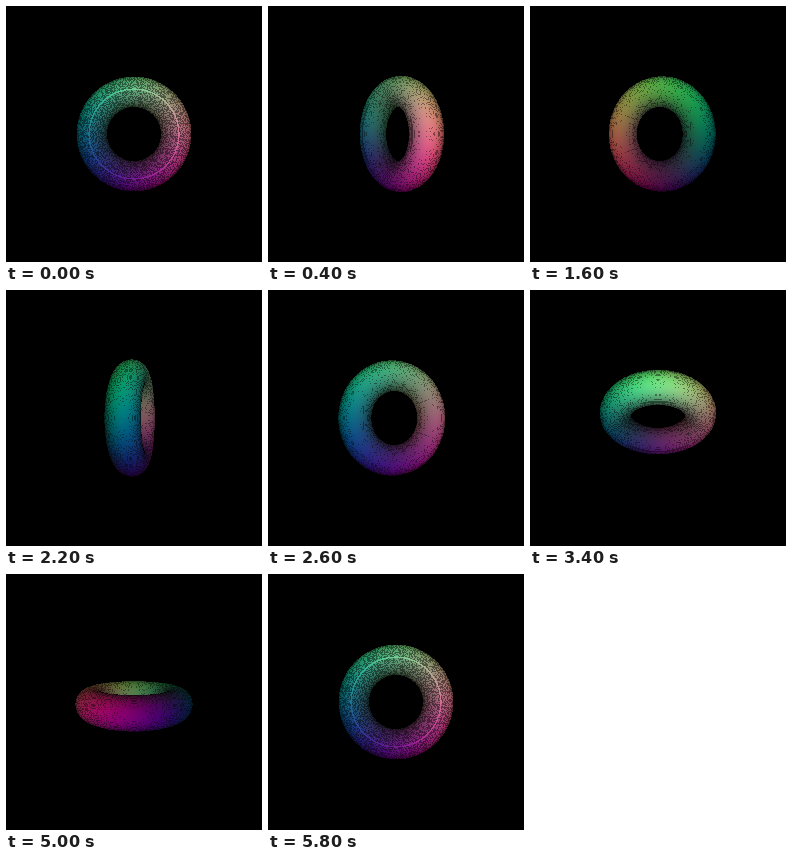
Animation, 256 px wide and 256 px high, one loop 6 s. Source, as an HTML page with a canvas:

```html
<!DOCTYPE html>
<html lang="en">
<head>
<meta charset="utf-8">
<title>Orbiting torus</title>
<style>
  html, body { margin: 0; width: 100%; height: 100%; overflow: hidden; background: #000; }
  canvas { display: block; width: 100%; height: 100%; image-rendering: pixelated; }
</style>
</head>
<body>
<canvas id="stage" width="256" height="256"></canvas>
<script>
const ctx = document.getElementById('stage').getContext('2d');
const SIZE = 256, MID = 128, REACH = 62;
const RING = 42, TUBE = 15, DIST = 235;
const STEP = 200, POSES = 30, HALF = POSES / 2;
const image = ctx.createImageData(SIZE, SIZE);

// The camera circles sideways first, then over the top, always upright.
function cameraDir(pose) {
  const a = (pose % HALF) / (HALF - 1) * 2 * Math.PI;
  const s = Math.sin(a), c = Math.cos(a);
  return pose < HALF ? [s, 0, c] : [0, s, c];
}

function cross(a, b) {
  return [
    a[1] * b[2] - a[2] * b[1],
    a[2] * b[0] - a[0] * b[2],
    a[0] * b[1] - a[1] * b[0]
  ];
}

function normalize(v) {
  const len = Math.hypot(...v);
  return v.map(n => n / len);
}

function noise(x, y) {
  const n = Math.sin(x * 12.9898 + y * 78.233) * 43758.5453;
  return n - Math.floor(n);
}

// Distance along the ray to the torus, or -1 on a miss.
function trace(eye, dir) {
  let t = DIST - REACH;
  for (let i = 0; i < 90 && t < DIST + REACH; i++) {
    const x = eye[0] + dir[0] * t, y = eye[1] + dir[1] * t, z = eye[2] + dir[2] * t;
    const q = Math.sqrt(x * x + y * y) - RING;
    const d = Math.sqrt(q * q + z * z) - TUBE;
    if (d < 0.001) return t;
    t += d;
  }
  return -1;
}

// Fine dark grain, denser where the surface turns away from the camera.
function grain(t, facing, px, py, faceOn) {
  if (faceOn) return noise(px, py) < 0.5 ? 0.5 : 0.88;
  const depth = t * 2.7;
  const share = 0.5 * (1 - facing * facing);
  return depth - Math.floor(depth) < share ? 0.55 : 0.92;
}

function shade(p, dir, t, px, py, faceOn) {
  const [x, y, z] = p;
  const rho = Math.hypot(x, y), q = rho - RING;
  if (faceOn && Math.abs(q) < 0.65) return 0.9;
  const normal = [x * q / rho / TUBE, y * q / rho / TUBE, z / TUBE];
  const facing = Math.max(0, -normal.reduce((sum, n, i) => sum + n * dir[i], 0));
  const inner = 0.85 + 0.15 * q / TUBE;
  return (0.3 + 0.7 * facing) * inner * grain(t, facing, px, py, faceOn);
}

function draw(pose) {
  const back = cameraDir(pose);
  const right = normalize(cross([0, 1, 0], back));
  const up = cross(back, right);
  const eye = back.map(n => n * DIST);
  const faceOn = Math.abs(back[2]) > 0.999;
  const data = image.data;
  for (let py = 0; py < SIZE; py++) {
    for (let px = 0; px < SIZE; px++) {
      const at = (py * SIZE + px) * 4;
      data[at] = data[at + 1] = data[at + 2] = 0;
      data[at + 3] = 255;
      const u = px + 0.5 - MID, v = MID - py - 0.5;
      if (Math.abs(u) > REACH || Math.abs(v) > REACH) continue;
      const dir = normalize(back.map((n, i) => right[i] * u + up[i] * v - n * DIST));
      const t = trace(eye, dir);
      if (t < 0) continue;
      const p = eye.map((n, i) => n + dir[i] * t);
      const light = shade(p, dir, t, px, py, faceOn);
      // Position on the torus gives the colour.
      for (let i = 0; i < 3; i++) data[at + i] = 255 * light * (0.5 + p[i] / 110);
    }
  }
  ctx.putImageData(image, 0, 0);
}

const start = performance.now();
let shown = -1;

function tick() {
  const pose = Math.floor((performance.now() - start) / STEP) % POSES;
  if (pose !== shown) draw(shown = pose);
  requestAnimationFrame(tick);
}
tick();
</script>
</body>
</html>
```
